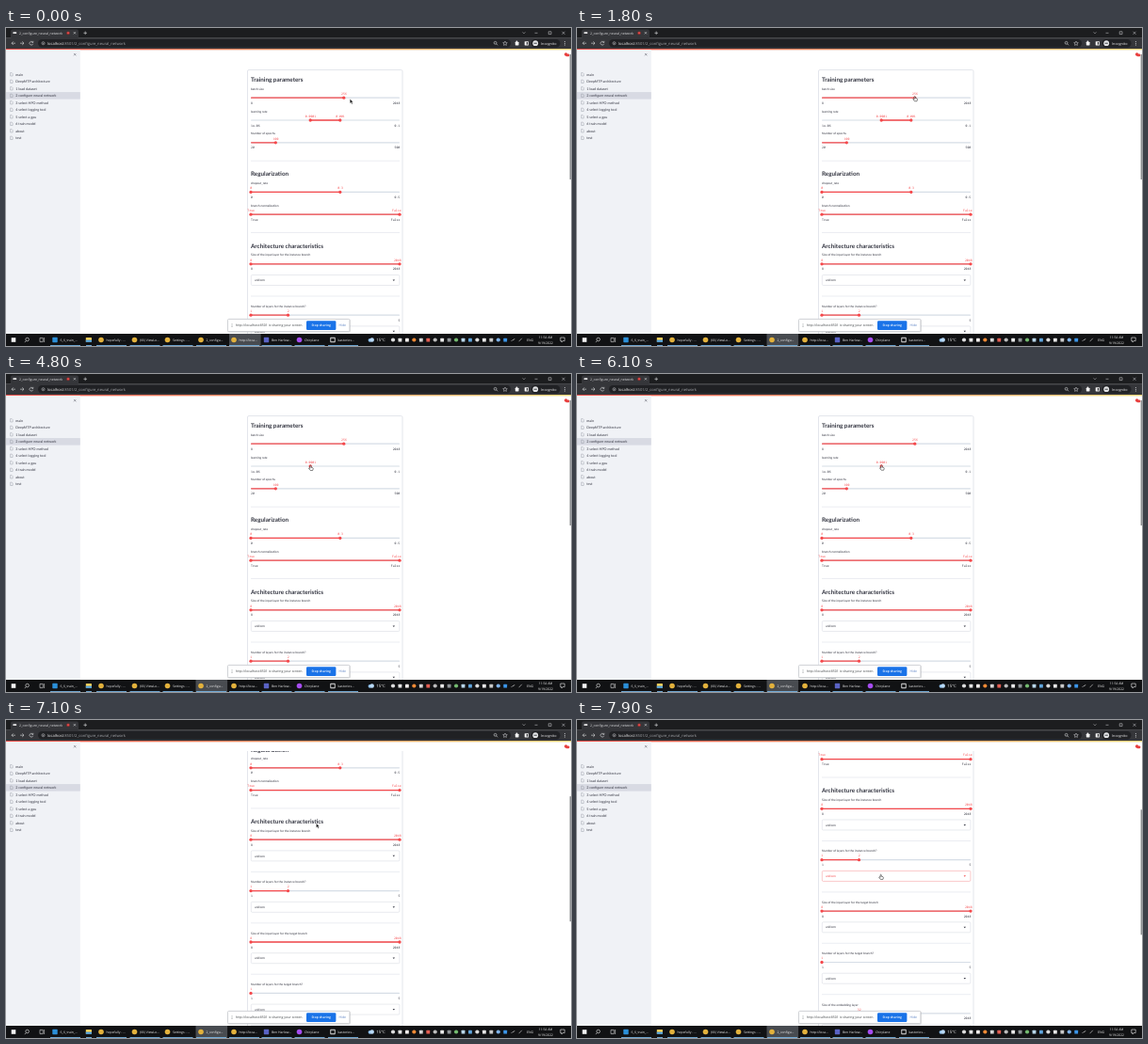
Write an HTML page that moves like this. It is 600 by 338 pixels and loops after 8 s.

```html
<!DOCTYPE html>
<html lang="en">
<head>
<meta charset="utf-8">
<title>Training settings</title>
<style>
html, body { margin: 0; width: 100%; height: 100%; overflow: hidden; background: #fff; }
svg { display: block; width: 600px; height: 338px; }
text { text-rendering: geometricPrecision; white-space: pre; }
.page { font-family: Lato, sans-serif; }
.mono { font-family: "Noto Sans Mono", monospace; }
.ui { font-family: "Open Sans", sans-serif; }
</style>
</head>
<body>
<svg id="stage" viewBox="0 0 600 338"></svg>
<script>
const RED = '#f5484b', INK = '#31333f', PALE = '#e3e6ec';
const stage = document.getElementById('stage');

function add(tag, attrs, parent = stage) {
  const node = document.createElementNS('http://www.w3.org/2000/svg', tag);
  for (const key in attrs) node.setAttribute(key, attrs[key]);
  parent.appendChild(node);
  return node;
}
const group = parent => add('g', {}, parent);
const rect = (x, y, width, height, fill, parent, rx = 0) =>
  add('rect', { x, y, width, height, fill, rx }, parent);
const dot = (cx, cy, r, fill, parent) => add('circle', { cx, cy, r, fill }, parent);
const line = (d, stroke, parent, width = 0.6) =>
  add('path', { d, stroke, fill: 'none', 'stroke-width': width }, parent);

// y is the optical middle of the line of text
function label(x, y, string, size, fill, parent, font = 'ui', more = {}) {
  const node = add('text', { x, y: y + size * 0.35, fill, class: font, 'font-size': size, ...more }, parent);
  node.textContent = string;
  return node;
}
const middle = { 'text-anchor': 'middle' }, end = { 'text-anchor': 'end' };

// Scrolling form
const LEFT = 260, SPAN = 158;
const form = group();
rect(256.5, 44.5, 164.5, 500, 'none', form, 1.5).setAttribute('stroke', PALE);

const title = (y, s) => label(LEFT, y, s, 6.3, INK, form, 'page', { 'font-weight': 700 });
const divider = y => line(`M260 ${y}H418`, PALE, form, 0.7);

function slider(y, name, min, max, values) {
  label(LEFT, y - 9.5, name, 3.2, INK, form, 'page');
  rect(LEFT, y - 0.6, SPAN, 1.2, '#d6dde6', form, 0.6);
  const xs = values.map(v => LEFT + v[0] * SPAN);
  const from = values.length > 1 ? xs[0] : LEFT;
  const bar = rect(from, y - 0.65, xs[xs.length - 1] - from, 1.3, RED, form, 0.6);
  const marks = values.map(([, s], i) => {
    const g = group(form);
    dot(xs[i], y, 1.65, RED, g);
    label(Math.min(xs[i] + 0.2, 419.6 - s.length * 0.96), y - 4.4, s, 3.2, RED, g, 'mono', middle);
    return g;
  });
  label(LEFT, y + 5.4, min, 3.2, INK, form, 'mono');
  label(418.3, y + 5.4, max, 3.2, INK, form, 'mono', end);
  return { bar, marks };
}

function picker(y) {
  const box = rect(260.3, y - 5.5, 157.6, 11, '#fff', form, 1.2);
  box.setAttribute('stroke-width', 0.6);
  const text = label(264, y, 'uniform', 3.2, INK, form, 'page');
  const arrow = add('path', { d: `M410.6 ${y - 0.6}h2.4l-1.2 1.5z` }, form);
  return hover => {
    box.setAttribute('stroke', hover ? '#f7a3a4' : '#d9dce3');
    text.setAttribute('fill', hover ? RED : INK);
    arrow.setAttribute('fill', hover ? RED : INK);
  };
}

title(54.6, 'Training parameters');
slider(74.2, 'batch size', '8', '2048', [[0.625, '256']]);
const rate = slider(98, 'learning rate', '1e-06', '0.1', [[0.4, '0.0001'], [0.6, '0.001']]);
slider(121.8, 'Number of epochs', '20', '500', [[1 / 6, '100']]);
divider(141.2);
title(155, 'Regularization');
slider(174.4, 'dropout_rate', '0', '0.5', [[0, '0'], [0.6, '0.3']]);
slider(198.2, 'branch normalization', 'True', 'False', [[0, 'True'], [1, 'False']]);
divider(217.5);
title(231.3, 'Architecture characteristics');

const full = [[0, '8'], [1, '2048']];
const pickers = [
  ['Size of the input layer for the instance branch', '8', '2048', full],
  ['Number of layers for the instance branch?', '1', '5', [[0, '1'], [0.25, '2']]],
  ['Size of the input layer for the target branch', '8', '2048', full],
  ['Number of layers for the target branch?', '1', '5', [[0, '1']]],
  ['Size of the embedding layer', '8', '2048', [[0.25, '32']]]
].map(([name, min, max, values], i) => {
  const y = 250.8 + i * 54.4;
  slider(y, name, min, max, values);
  divider(y + 34.2);
  return picker(y + 17.2);
});

// Page header and scrollbar
rect(79, 22, 521, 11, '#fff');
const fade = add('linearGradient', { id: 'fade' }, add('defs', {}));
add('stop', { offset: 0, 'stop-color': '#f4504b' }, fade);
add('stop', { offset: 1, 'stop-color': '#f6d878' }, fade);
rect(0, 22, 600, 1.3, 'url(#fade)');
dot(594.6, 28, 1.7, '#e8403f');
rect(594.4, 27.4, 4, 2.8, '#e8403f', stage, 1.2);
const thumb = rect(598.6, 0, 1.4, 133, '#8f9194');

// Sidebar
rect(0, 23, 78.8, 303, '#f0f2f6');
rect(0, 68.1, 78.8, 7.5, '#d8dae3');
line('M72 27l2.4 2.4M74.4 27l-2.4 2.4', '#555762', stage, 0.5);
['main', 'DeepMTP architecture', '1 load dataset', '2 configure neural network',
 '3 select HPO method', '4 select logging tool', '5 select a gpu', '6 train model',
 'about', 'test'].forEach((s, i) => {
  const y = 49.3 + i * 7.5;
  line(`M4.6 ${y - 1.7}h1.6l.9 .9v2.5h-2.5z`, '#8a8d99', stage, 0.4);
  label(10.3, y, s, 3.65, INK, stage, 'page');
});

// Browser frame
rect(0, 0, 600, 10.5, '#1c1d1f');
rect(5, 1.6, 72, 10, '#35363a', stage, 2);
rect(0, 10.2, 600, 11.8, '#35363a');
rect(7.4, 4.3, 3.8, 1.6, '#e9e9e9', stage, 0.5);
label(14, 5.3, '2_configure_neural_network', 3.5, '#e4e5e7');
dot(66, 5.3, 1.9, '#8d3030');
dot(66, 5.3, 1, '#f05050');
const LIGHT = '#dcdde0';
line('M71.8 4.2l2.2 2.2M74 4.2l-2.2 2.2M82.4 5.3h3.6M84.2 3.5v3.6', LIGHT);
line('M548.6 4.4l1.4 1.4l1.4-1.4M561.5 5.3h3M590.5 3.8l3 3M593.5 3.8l-3 3', LIGHT, stage, 0.5);
line('M576.2 3.8h2.8v2.8h-2.8z', LIGHT, stage, 0.5);
rect(34, 12, 502, 8.4, '#202124', stage, 4.2);
line('M10 16.2h-4M7.8 14.4l-1.8 1.8l1.8 1.8M15 16.2h4M17.2 14.4l1.8 1.8l-1.8 1.8', LIGHT);
line('M28.4 15a1.9 1.9 0 1 0 .3 1.8M28.8 13.8v1.6h-1.6', LIGHT);
add('circle', { cx: 39.5, cy: 16.2, r: 1.5, fill: 'none', stroke: LIGHT, 'stroke-width': 0.5 });
line('M39.5 15.9v1.1', LIGHT, stage, 0.5);
label(44, 16.2, 'localhost', 4.1, '#f0f0f1').insertAdjacentHTML('beforeend',
  '<tspan fill="#a3a6aa">:8501/2_configure_neural_network</tspan>');
add('circle', { cx: 519.6, cy: 15.8, r: 1.4, fill: 'none', stroke: LIGHT, 'stroke-width': 0.6 });
line('M520.6 16.8l1.5 1.5', LIGHT);
line('M530 14l.7 1.5l1.6 .2l-1.2 1.1l.3 1.6l-1.4-.8l-1.4 .8l.3-1.6l-1.2-1.1l1.6-.2z', LIGHT, stage, 0.5);
rect(540.8, 14.7, 3.7, 3.7, '#f2f2f2', stage, 0.6);
dot(542.4, 14.5, 0.9, '#f2f2f2');
rect(550.7, 14.2, 4.2, 4.2, '#f2f2f2', stage, 0.4);
rect(552.8, 15, 1.3, 2.6, '#35363a');
rect(557.5, 12, 31, 8.4, '#202124', stage, 4.2);
dot(562.2, 16.2, 2.9, '#e4e5e7');
rect(560.6, 15.7, 3.2, 1, '#3c4043');
label(568, 16.2, 'Incognito', 3.8, '#f0f0f1');
[14.4, 16.2, 18].forEach(y => dot(593.4, y, 0.5, LIGHT));

// Screen sharing notice
rect(235, 309.4, 131, 14.3, 'rgba(60,64,67,.16)', stage, 1.6);
rect(235.5, 309.4, 129.4, 13.2, '#fff', stage, 1.2).setAttribute('stroke', '#d0d2d6');
for (let i = 0; i < 6; i++) dot(239.4 + (i % 2) * 1.2, 314.8 + (i >> 1) * 1.3, 0.35, '#85888c');
label(244, 316.1, 'http://localhost:8501 is sharing your screen.', 3.5, '#3c4043');
rect(319, 311.2, 31.4, 9.8, '#1a73e8', stage, 1.2);
label(334.7, 316.1, 'Stop sharing', 3.4, '#fff', stage, 'ui', { ...middle, 'font-weight': 600 });
label(357.3, 316.1, 'Hide', 3.5, '#5d83c4', stage, 'ui', middle);

// Taskbar
rect(0, 325, 600, 13, '#111214');
const active = rect(0, 325, 33.6, 13, '#484b50');
rect(5.7, 329.2, 4.6, 4.6, '#f4f4f4');
add('circle', { cx: 22.6, cy: 331, r: 1.8, fill: 'none', stroke: '#eee', 'stroke-width': 0.6 });
line('M21.4 332.4l-1.6 1.7', '#eee');
line('M36 329.4h3.2v4.2h-3.2zM40.6 329v5', '#ddd');
rect(84.8, 329, 6.2, 4.8, '#f4cc58', stage, 0.5);
rect(84.8, 331.6, 6.2, 2.2, '#4b9fe0');
const BALL = '#e2b13c';
[
  [52, '#2b8fd8', '6_6_train_...'], [101, BALL, 'hopefully - ...'],
  [136.5, BALL, '(66) ViewLo...'], [171.5, BALL, 'Settings - ...'],
  [207, BALL, '2_configu...'], [242, BALL, 'http://loca...'],
  [276.5, '#5a63c4', 'Ben Harlow...'], [311.5, '#a64cf0', 'Chirplane'],
  [347, '#d8d8d8', 'kastorios...']
].forEach(([x, color, name], i) => {
  if (i === 0 || i === 6 || i === 8) rect(x - 2.7, 328.8, 5.4, 5.4, color, stage, 0.6);
  else dot(x, 331.5, 2.8, color);
  label(x + 5.4, 331.5, name, 3.45, '#f1f1f1');
  rect(x - 5, 337.1, 32, 0.9, '#76b4e4');
});
rect(85, 337.1, 6, 0.9, '#76b4e4');
rect(345.2, 329.8, 3.6, 3.4, '#17181a');
dot(386.5, 331.8, 1.9, '#8fc1f0');
dot(388.7, 331.5, 2.2, '#b9daf7');
label(393.2, 331.5, '15°C', 4.4, '#f1f1f1');
['#ddd', '#e6e6e6', '#f5f0ee', '#ef8a35', '#d6d6d6', '#e35d52', '#bcbcbc', '#e9e9e9', '#8f9498',
 '#74bb70', '#b9d7ea', '#61a7df', '#dadada', '#e9e9e9', '#c9c9c9', '#7fb2e8', '#3b95e8']
  .forEach((color, i) => {
    const x = 411 + i * 7.45;
    if (i % 3) rect(x - 1.9, 329.7, 3.8, 3.8, color, stage, 0.6);
    else dot(x, 331.5, 2.1, color);
  });
line('M536.5 333l1.4-1.4h1.2l1-1.6M544.6 333.2l3.2-3.4', '#ddd');
label(553, 331.5, 'ENG', 3.5, '#f1f1f1');
label(573, 328.7, '11:54 AM', 3.4, '#f1f1f1', stage, 'ui', middle);
label(573, 334.7, '9/19/2022', 3.4, '#f1f1f1', stage, 'ui', middle);
line('M588.8 329h4.4v3.6h-2l-1.2 1.4v-1.4h-1.2z', '#eee');

// Pointers, each drawn around its own hot spot
const shape = (d, fill, stroke, width) =>
  add('path', { d, fill, stroke, 'stroke-width': width, 'stroke-linejoin': 'round' });
const pointers = {
  arrow: shape('M0 0v4.5l1.1-1l.8 1.8l.8-.4l-.8-1.7h1.4z', '#111', '#fff', 0.25),
  hand: shape('M-.6 .4q.6-.8 1.1 0v1.6l1.8 .5q.6 .3 .4 1.1l-.5 1.6h-2.5l-1.7-2.1q.1-.8 .8-.4l.6 .5z',
    '#fff', '#222', 0.55),
  grab: shape('M-1.7 -.5q.2-1.2 1.2-1.1q1.2-.5 2.1 .4q.6 .8 .2 2l-.6 1.1h-2l-1.2-1.2z',
    '#fff', '#222', 0.6)
};

// [time, x, y]
const MOVES = [[0, 365.3, 75.6], [400, 365.3, 75.6], [1000, 358.8, 72.6], [2000, 358.8, 72.6],
  [2700, 355, 97], [3000, 355, 98.2], [3600, 339.3, 98.2], [4200, 323.5, 97.4], [6200, 323.5, 97],
  [6500, 329.5, 110], [7300, 329.5, 110], [7700, 322.7, 164.2], [8000, 322.7, 164.2]];
const SCROLL = [[0, 0], [6500, 0], [6700, 34.3], [6900, 80], [7100, 123.6], [7300, 156.5], [8000, 156.5]];
const POSES = [[0, 'arrow'], [1000, 'hand'], [2100, 'arrow'], [2700, 'hand'], [3000, 'grab'],
  [4300, 'hand'], [6300, 'arrow'], [7600, 'hand']];

function at(track, t, column = 1) {
  const i = Math.max(1, track.findIndex(k => k[0] > t));
  const a = track[i - 1], b = track[i];
  return a[column] + (b[column] - a[column]) * (t - a[0]) / (b[0] - a[0]);
}

function draw(t) {
  const scroll = at(SCROLL, t), x = at(MOVES, t), y = at(MOVES, t, 2);
  form.setAttribute('transform', `translate(0 ${-scroll})`);
  thumb.setAttribute('y', 28 + scroll * 0.43);
  active.setAttribute('x', t < 900 ? 237 : 201.5);

  const merged = t >= 3700;
  rate.bar.setAttribute('visibility', merged ? 'hidden' : 'visible');
  rate.marks[1].setAttribute('visibility', merged ? 'hidden' : 'visible');

  pickers.forEach((paint, i) => {
    const cy = 268 + i * 54.4 - scroll;
    paint(t >= 7400 && Math.abs(y - cy) < 5.5);
  });

  const pose = POSES.filter(p => p[0] <= t).pop()[1];
  for (const name in pointers) {
    pointers[name].setAttribute('visibility', name === pose ? 'visible' : 'hidden');
    pointers[name].setAttribute('transform', `translate(${x} ${y})`);
  }
}

const start = performance.now();
function tick() {
  const t = (performance.now() - start) % 8000;
  draw(Math.floor(t / 100) * 100);
  requestAnimationFrame(tick);
}
tick();
</script>
</body>
</html>
```
